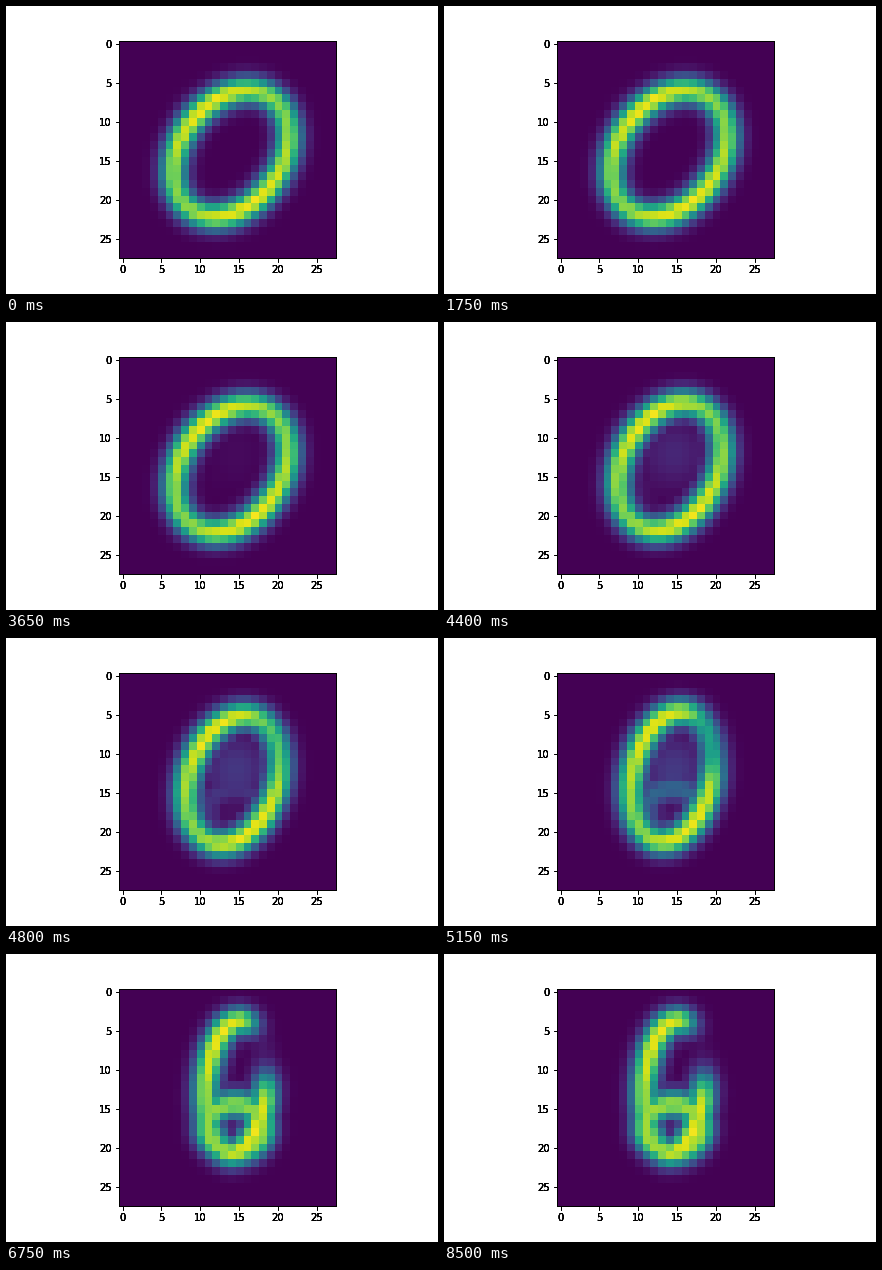
Recreate the animation shown at these times as a matplotlib script. Size 432x288 px, loop 10000 ms.

```python
import numpy as np
import matplotlib.pyplot as plt
from matplotlib.animation import FuncAnimation

FRAMES, INTERVAL = 200, 50
SIZE = 28
YY, XX = np.mgrid[:SIZE, :SIZE]
THETA = np.radians(np.arange(-180, 180, 4))  # 0 is right, 90 is down


def mix(start, end, u):
    return start + (end - start) * u


def loop(cx, cy, rx, ry, lean, brightness, width=1.75):
    """Soft brush along a leaning ellipse."""
    x = cx + rx * np.cos(THETA) - lean * np.sin(THETA)
    y = cy + ry * np.sin(THETA)
    dist = np.hypot(XX[..., None] - x, YY[..., None] - y)
    return (brightness * np.exp(-(dist / width)**2)).max(axis=-1)


def digit(u):
    """Brightness of the digit, from a zero (u=0) to a six (u=1)."""
    # The upper right of the outline fades away and leaves the six open.
    gap = np.exp(-((THETA + np.radians(38)) / np.radians(35))**4)
    light = .91 + .08 * np.cos(2 * (THETA - np.radians(50)))
    light *= 1 - .95 * u**2.2 * gap
    outline = loop(mix(13.9, 14.5, u), mix(14.1, 12.2, u), mix(7.1, 3.8, u),
                   mix(8.1, 8.5, u), mix(2.1, .5, u), light)

    bowl = loop(14.4, 17.5, 3.6, 3.1, 0, .87 * u**1.8)
    haze = .7 * u * (1 - u) * np.exp(-((XX - 14.5)**2 + (YY - 12)**2) / 20)
    return np.maximum.reduce([outline, bowl, haze])


def progress(frame):
    return 1 / (1 + np.exp(-(frame * INTERVAL - 5000) / 420))


def add_axes():
    ax = fig.add_axes([.125, .125, .775, .755], facecolor="none")
    ax.set(xlim=(-.5, SIZE - .5), ylim=(SIZE - .5, -.5), aspect="equal",
           xticks=range(0, SIZE, 5), yticks=range(0, SIZE, 5))
    return ax


plt.rcParams.update({"font.family": "DejaVu Sans", "font.size": 10})
fig = plt.figure(figsize=(6, 4), dpi=72, facecolor="white")
# Stacked axes make the frame, ticks and labels solid black.
ax = [add_axes() for _ in range(5)][0]
image = ax.imshow(digit(progress(0)), cmap="viridis", vmin=0, vmax=1,
                  interpolation="nearest")


def update(frame):
    image.set_data(digit(progress(frame)))
    return [image]


anim = FuncAnimation(fig, update, frames=FRAMES, interval=INTERVAL,
                     repeat=True, repeat_delay=0)
plt.show()
```
